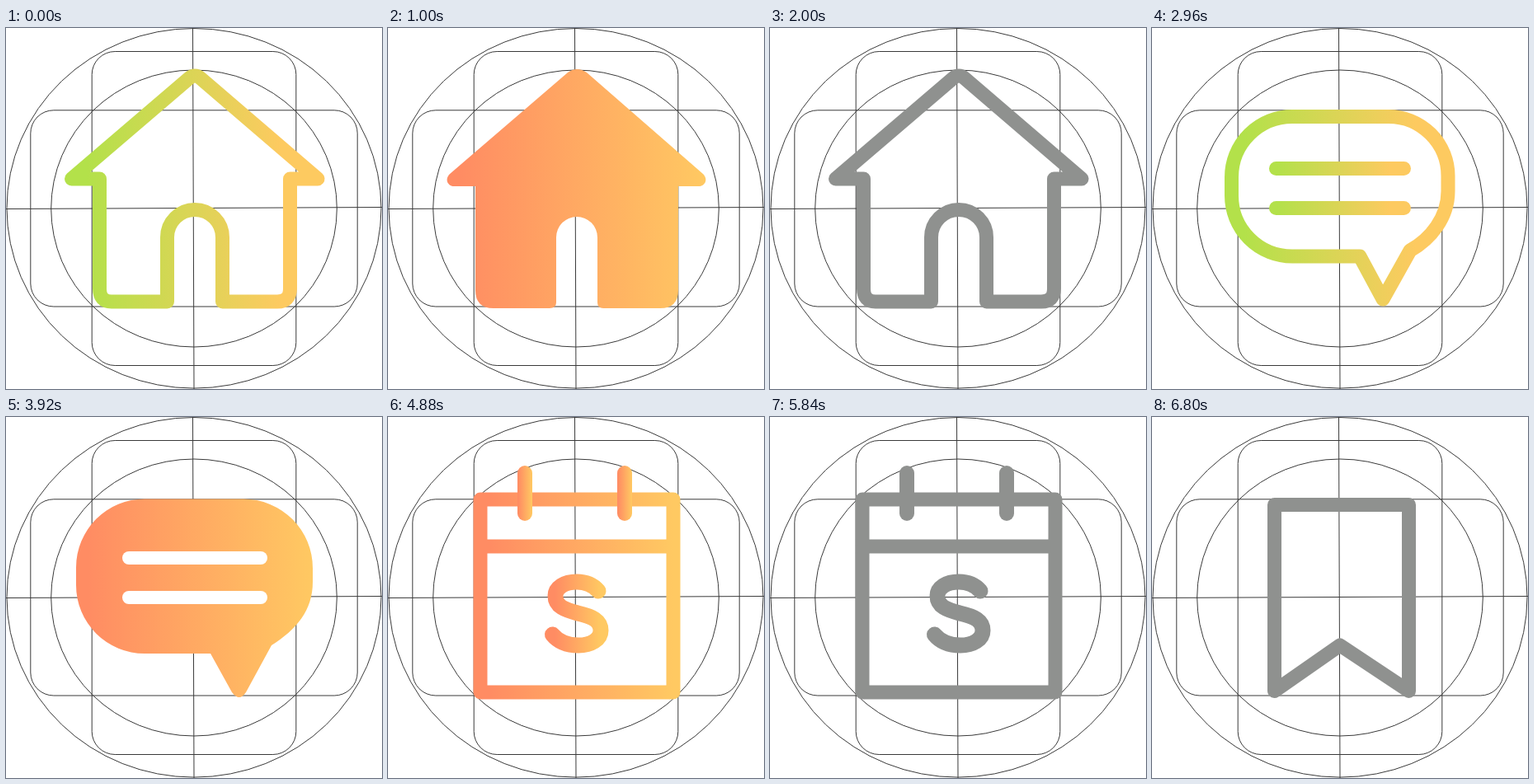
An HTML page that plays this animation: 456 px wide and 438 px high, repeating every 7760 ms.

```html
<!DOCTYPE html>
<html lang="en">
<head>
<meta charset="utf-8">
<title>Icon grid</title>
<style>
  html, body { margin: 0; width: 100%; height: 100%; overflow: hidden; background: #fff; }
  svg { display: block; }
  .guides { fill: none; stroke: #3a3a3a; stroke-width: 1; }
  .line { fill: none; stroke: var(--paint); stroke-width: 17; stroke-linejoin: round; stroke-linecap: round; }
  .solid { fill: var(--paint); }
  .s { stroke-width: 19; }
</style>
</head>
<body>
<svg width="456" height="438" viewBox="0 0 456 438">
  <defs>
    <linearGradient id="lime">
      <stop offset=".06" stop-color="#b3e14a"/>
      <stop offset=".85" stop-color="#fdca60"/>
    </linearGradient>
    <linearGradient id="sunset">
      <stop offset=".05" stop-color="#ff8c63"/>
      <stop offset="1" stop-color="#ffc962"/>
    </linearGradient>
  </defs>

  <g class="guides">
    <ellipse cx="228" cy="218.8" rx="227" ry="218.3"/>
    <ellipse cx="228" cy="219" rx="173.3" ry="168"/>
    <rect x="104.2" y="28.5" width="247.6" height="381" rx="28"/>
    <rect x="29.8" y="99.8" width="396.4" height="238.2" rx="28"/>
    <path d="M0 219.5L456 217.5M226.5 0L228 438"/>
  </g>

  <g id="house">
    <path class="line" d="M222 61Q229 55 236 61L378 183H344.5V316Q344.5 332 329 332H262.5V254A33.5 33.5 0 0 0 195.5 254V332H128Q113.5 332 113.5 316V183H79.5Z"/>
  </g>
  <g id="houseSolid">
    <path class="solid" d="M218 54Q229 46 241 54L382 177C389 184 384 192 377 192H352V318Q352 340 330 340H261Q254 340 254 333V254A25 25 0 0 0 204 254V333Q204 340 196 340H128Q106 340 106 318V192H80C73 192 68 184 75 177Z"/>
  </g>
  <g id="chat">
    <path class="line" d="M170 107.5H287A72 72 0 0 1 359 179.5V198C359 230 338 256 313 270L280 329L252 277H170A73.5 73.5 0 0 1 96.5 203.5V181A73.5 73.5 0 0 1 170 107.5Z"/>
    <rect class="solid" x="142" y="162" width="172" height="17" rx="8.5"/>
    <rect class="solid" x="142" y="210" width="172" height="17" rx="8.5"/>
  </g>
  <g id="chatSolid">
    <path class="solid" d="M168 99.5H288A84 84 0 0 1 372 183.5V200C372 235 352 258 322 277L291 334Q283 346 274 334L248 287H168A83 83 0 0 1 85 204V182.5A83 83 0 0 1 168 99.5Z"/>
    <g fill="#fff">
      <rect x="141" y="163" width="176" height="16" rx="8"/>
      <rect x="141" y="211" width="176" height="16" rx="8"/>
    </g>
  </g>
  <g id="calendar">
    <path class="line" d="M112 100H346V334H112ZM112 157H346"/>
    <rect class="solid" x="157" y="59" width="18" height="67" rx="9"/>
    <rect class="solid" x="278" y="59" width="18" height="67" rx="9"/>
    <path class="line s" d="M255 211C248 203 239 200 229 200C214 200 203 207 203 217C203 230 215 234 230 238C248 242 258 247 258 259C258 270 246 277 231 277C217 277 206 272 199.5 264"/>
  </g>
  <g id="bookmark">
    <path class="line" d="M148.5 106.5H311.5V332.5L228 277L148.5 332.5Z"/>
  </g>
</svg>
<script>
const LOOP = 7760;
const lime = 'url(#lime)', sunset = 'url(#sunset)', grey = '#8f918f';

// [start ms, icon, paint]
const scenes = [
  [0, 'house', lime],
  [1000, 'houseSolid', sunset],
  [2000, 'house', grey],
  [2960, 'chat', lime],
  [3920, 'chatSolid', sunset],
  [4880, 'calendar', sunset],
  [5840, 'calendar', grey],
  [6800, 'bookmark', grey],
];
const icons = [...document.querySelectorAll('svg > g[id]')];

function draw() {
  const time = performance.now() % LOOP;
  const [, name, paint] = scenes.findLast(([start]) => time >= start);
  for (const icon of icons) {
    icon.style.display = icon.id === name ? '' : 'none';
    icon.style.setProperty('--paint', paint);
  }
  requestAnimationFrame(draw);
}
draw();
</script>
</body>
</html>
```
